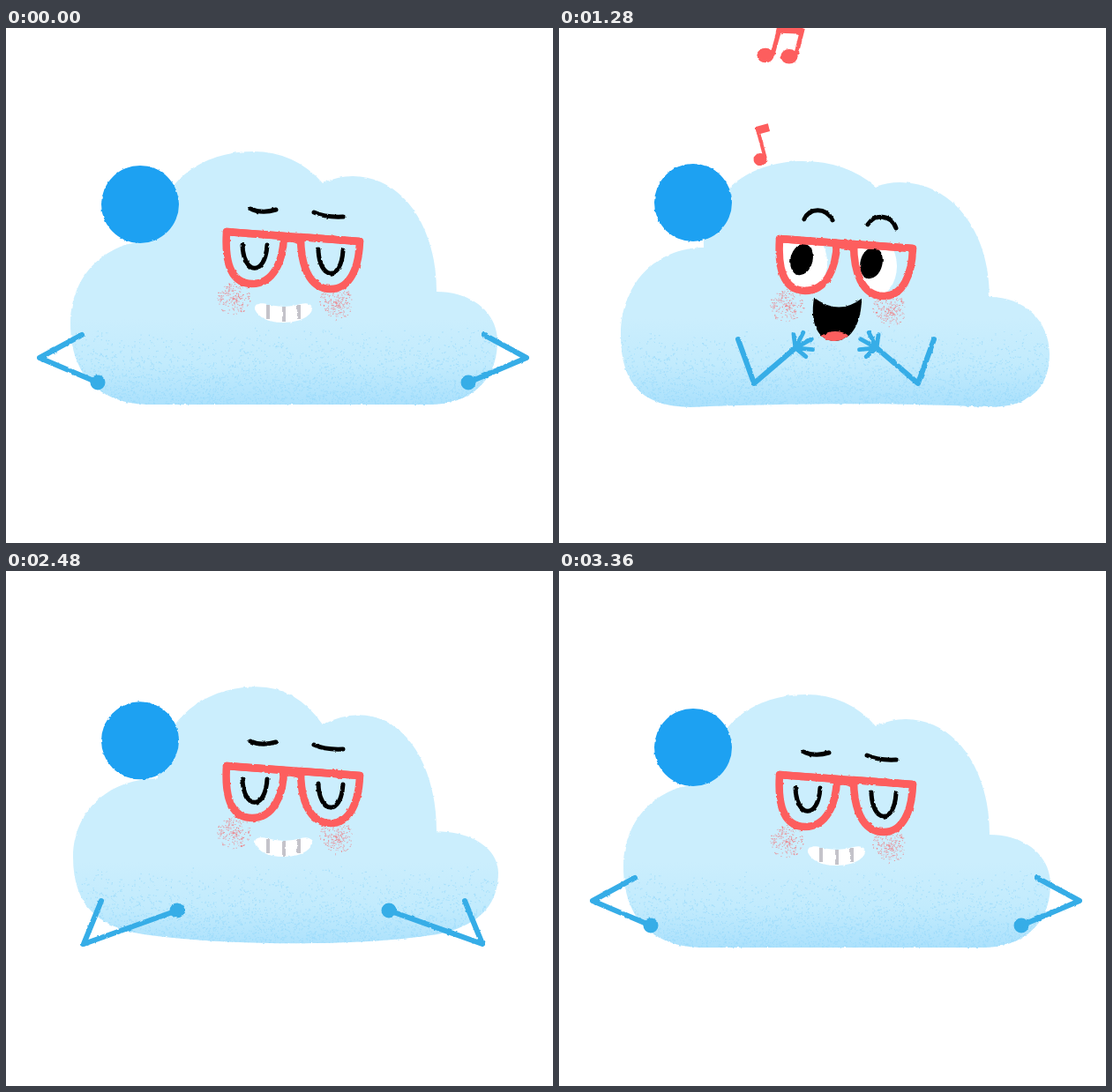
An HTML page for the animation above (3.84 s loop, 620 px wide and 584 px high).

```html
<!DOCTYPE html>
<html lang="en">
<head>
<meta charset="utf-8">
<title>Singing cloud</title>
<style>
  html, body { margin: 0; width: 100%; height: 100%; overflow: hidden; background: #fff; }
  svg { display: block; width: 100%; height: 100%; }
  .line, .arm, .red { fill: none; stroke-linecap: round; stroke-linejoin: round; }
  .line { stroke: #000; stroke-width: 5; }
  .arm { stroke: #36ade7; stroke-width: 6; }
  .red { stroke: #fd5e5e; stroke-width: 8.5; }
  .note { fill: #fd5e5e; }
  .note path { fill: none; stroke: #fd5e5e; stroke-width: 4; }
</style>
</head>
<body>
<svg viewBox="0 0 620 584">
  <defs>
    <filter id="rough" filterUnits="userSpaceOnUse" x="0" y="0" width="620" height="584" color-interpolation-filters="sRGB">
      <feTurbulence type="fractalNoise" baseFrequency=".18" numOctaves="2" seed="4"/>
      <feDisplacementMap in="SourceGraphic" scale="2.5" xChannelSelector="R" yChannelSelector="G"/>
    </filter>
    <linearGradient id="shade" gradientUnits="userSpaceOnUse" x1="0" y1="330" x2="0" y2="432">
      <stop offset="0" stop-color="#cbeefd"/>
      <stop offset=".5" stop-color="#c2ebfd"/>
      <stop offset="1" stop-color="#a9e0fc"/>
    </linearGradient>
    <clipPath id="cloudClip"><path class="cloud"/></clipPath>
    <clipPath id="mouthClip"><path class="mouth"/></clipPath>
    <clipPath id="lensClip"><path class="lens"/></clipPath>
  </defs>
  <g filter="url(#rough)">
    <path class="cloud" fill="url(#shade)"/>
    <g clip-path="url(#cloudClip)"><path id="grain" fill="none" stroke="#93d8fa" stroke-width="1.3" opacity=".6"/></g>
    <circle id="ball" cx="152" r="44" fill="#1da1f2"/>
    <g id="face">
      <path id="blush" fill="none" stroke="#f0797e" opacity=".7"/>
      <g id="awake">
        <g clip-path="url(#lensClip)" fill="#fff">
          <ellipse cx="276" cy="258" rx="28" ry="36"/>
          <ellipse cx="356" cy="262" rx="27" ry="36"/>
        </g>
        <ellipse cx="275" cy="254.500" rx="12.500" ry="18" transform="rotate(14 275 254.500)"/>
        <ellipse cx="354" cy="258.500" rx="12.500" ry="18" transform="rotate(14 354 258.500)"/>
        <path id="browL" class="line" d="M278 203C284 190 302 189 310 204"/>
        <path id="browR" class="line" d="M350 209C357 197 376 197 382 213"/>
        <path class="mouth"/>
        <ellipse id="tongue" cx="313" rx="18" ry="11" fill="#fd5e5e" clip-path="url(#mouthClip)"/>
      </g>
      <g id="asleep">
        <path class="line" d="M268 246C269 280 294 282 296 246M354 251C355 286 380 288 382 252"/>
        <path id="frown" class="line" d="M277 205Q290 211 306 206M349 209Q362 215 382 214"/>
        <g id="grin">
          <path fill="#fff" d="M282 319C281 311 291 312 296 313Q315 319 334 313C345 310 349 316 346 322C340 331 326 334 314 334C297 334 286 328 282 319Z"/>
          <path d="M297 314V330M315 316V333M332 314V330" fill="none" stroke="#c4c3ca" stroke-width="4"/>
        </g>
      </g>
      <path class="lens red"/>
      <path class="red" d="M250 231L401 242M314 240Q324 236 334 242"/>
    </g>
    <g class="arm">
      <g id="left"><path/><path stroke-width="4.800"/><circle r="5.500" fill="#36ade7"/></g>
      <use href="#left" transform="translate(628 0) scale(-1 1)"/>
    </g>
    <g id="single" class="note">
      <ellipse rx="7.500" ry="7"/><path d="M6 0V-35"/><rect x="4" y="-37" width="15" height="9"/>
    </g>
    <g id="double" class="note">
      <ellipse rx="7.500" ry="6.500"/><ellipse cx="21" cy="1" rx="7.500" ry="6.500"/>
      <path d="M6 0L13 -25M27 0L33 -24"/><polygon points="11,-29 34,-28 32,-19 9,-20"/>
    </g>
  </g>
</svg>
<script>
const LOOP = 3840, STEP = 80;
const SING = 240, REST = 1840, BACK = 2320, BEAT = 640;
const { sin, cos, min, max, abs, PI } = Math;
const $ = id => document.getElementById(id);
const setAll = (cls, d) => document.querySelectorAll('.' + cls).forEach(e => e.setAttribute('d', d));
const move = (el, x, y, more = '') => el.setAttribute('transform', `translate(${x} ${y}) ${more}`);
const show = (el, on) => el.setAttribute('display', on ? 'inline' : 'none');
const clamp = (v, lo = 0, hi = 1) => min(hi, max(lo, v));
const mix = (a, b, f) => a + (b - a) * f;
const ease = f => f * f * (3 - 2 * f);

// k runs from -1 (stretched) to 1 (squashed); drop lowers the whole body.
function body(t) {
  if (t < REST) {
    const fade = clamp((t - SING) / 160) * clamp((REST - t) / 160);
    return {
      k: fade * clamp(-1.4 * cos(2 * PI * (t - 880) / BEAT), -1, 1),
      drop: fade * 14 * max(0, sin(2 * PI * (t - 960) / BEAT))
    };
  }
  const u = clamp(t - BACK, 0, 1040), v = (u - 560) / 480;
  const k = v < 0 ? -clamp(1.4 * sin(PI * u / 560)) : .3 * sin(2 * PI * v) * (1 - v);
  return { k, drop: max(0, -k) * u / 70 };
}

// Quarter ellipse from a to b, leaving a along one axis and reaching b along the other
function quarter(a, b, flat) {
  const r = .58, [ax, ay] = a, [bx, by] = b;
  return flat
    ? `C${mix(ax, bx, r)} ${ay} ${bx} ${mix(by, ay, r)} ${bx} ${by}`
    : `C${ax} ${mix(ay, by, r)} ${mix(bx, ax, r)} ${by} ${bx} ${by}`;
}

function cloud(k, drop) {
  const at = (x, y, dx, dy) => [x + dx * k, y + dy * k + drop];
  const up = min(k, 0), down = max(k, 0);
  const neckL = at(168, 241, -4, 8), left = at(73, 335, -3, 13);
  const right = at(557, 355, -1, 15), neckR = at(488, 299, 0, 6);
  const small = at(393, 168, -7, 7), dip = at(359, 176, 0, 4), big = at(280, 140, -4, 11);
  const base = 427 + 16 * up + 3 * down + drop, belly = base - 12 * up - 5 * down;
  const footL = 165 - 15 * down, footR = 480 + 8 * down, tilt = base + 7 * up;
  return `M${neckL}${quarter(neckL, left, true)}
    C${left[0]} ${mix(left[1], base, .65)} ${footL - 58} ${tilt} ${footL} ${base}
    C260 ${belly} 400 ${belly} ${footR} ${base}
    C${footR + 48} ${tilt} ${right[0]} ${mix(right[1], base, .6)} ${right}
    ${quarter(right, neckR, false)}${quarter(neckR, small, false)}
    Q${mix(small[0], dip[0], .5)} ${small[1]} ${dip}
    Q${mix(big[0], dip[0], .6)} ${big[1]} ${big}${quarter(big, neckL, true)}Z`;
}

function mouth(k) {
  const a = abs(k), wide = max(k, 0) * 3;
  const l = 295 - 3 * a - wide, r = 340 + wide, y = 292 + 6 * a, b = 353 - 6 * a;
  $('tongue').setAttribute('cy', b);
  return `M${l} ${y}Q317 ${y + 21} ${r} ${y + 1}C${r} ${y + 26} 333 ${b} 313 ${b}C294 ${b} ${l - 5} ${y + 30} ${l} ${y}Z`;
}

// Shoulder, elbow and hand go from the hips, out low, to the clap.
function arm(t, k, singing) {
  const reach = t < BACK ? ease(clamp((t - SING) / 320)) : 1 - ease(clamp((t - BACK) / 320));
  const kick = t < BACK ? 0 : clamp(1 - (t - 2640) / 500);
  const a = abs(k), up = max(-k, 0);
  const hips = [86, 348, 38 - 10 * kick, 374 - 7 * kick, 104, 402];
  const low = [108, 374, 88, 423, 194, 385];
  const clap = [203, 353 - 6 * up, 229 - 8 * a, 394 + 9 * k, 268 + 15 * up, 347 + 16 * a];
  const [from, to, f] = reach < .5 ? [hips, low, reach * 2] : [low, clap, reach * 2 - 1];
  const [sx, sy, ex, ey, hx, hy] = from.map((v, i) => mix(v, to[i], f));

  const [bone, fingers, fist] = $('left').children;
  bone.setAttribute('d', `M${sx} ${sy}L${ex} ${ey}L${hx} ${hy}`);
  const dir = Math.atan2(hy - ey, hx - ex) + .2;
  let d = '';
  for (let i = -2; i <= 2; i++) {
    const q = dir + i * .6, len = 21 - 1.4 * i * i;
    d += `M${hx} ${hy}l${len * cos(q)} ${len * sin(q)}`;
  }
  fingers.setAttribute('d', d);
  move(fist, hx, hy);
  show(fingers, singing);
  show(fist, !singing);
}

function note(el, age, [x0, y0], [x1, y1], tilt) {
  show(el, age >= 80 && age < 640);
  const f = (age - 80) / 400;
  move(el, mix(x0, x1, f), mix(y0, y1, f), `rotate(${tilt * (1 - f)}) scale(${1 + .28 * f})`);
}

function draw(t) {
  const { k, drop } = body(t);
  const singing = t >= 480 && t < 2400;
  const up = max(-k, 0), down = max(k, 0);
  setAll('cloud', cloud(k, drop));
  move($('grain'), 0, drop - 7 * up + 3 * down);
  $('ball').setAttribute('cy', 200 + drop - 10 * up - 2 * down);

  move($('face'), 0, drop - 12.3 * up + 8 * down);
  show($('awake'), singing);
  show($('asleep'), !singing);
  const brow = 6 * down - 8 * up;
  move($('browL'), 0, brow);
  move($('browR'), 6 * up, brow);
  move($('frown'), 0, -2 * up);
  setAll('mouth', mouth(k));
  const grin = 1 + .45 * sin(PI * clamp((t - 2480) / 480));
  move($('grin'), 0, 322, `scale(1 ${grin}) translate(0 -322)`);
  arm(t, k, singing);

  note($('single'), t < 1200 ? t - 400 : t - 1200, [228, 149], [221, 37], -15);
  note($('double'), t - 800, [226, 155], [234, 31], 0);
}

let seed = 7;
const rnd = () => (seed = seed * 16807 % 2147483647) / 2147483647;
const dots = (n, place) => Array.from({ length: n }, () => {
  const [x, y] = place();
  return `M${x.toFixed(1)} ${y.toFixed(1)}h1.2`;
}).join('');
const puff = (x, y) => dots(190, () => {
  const q = rnd() * 2 * PI, r = 19 * rnd() ** .75;
  return [x + r * cos(q), y + r * sin(q)];
});

$('grain').setAttribute('d', dots(3600, () => [66 + rnd() * 496, 340 + 96 * Math.sqrt(rnd())]));
$('blush').setAttribute('d', puff(258, 307) + puff(374, 312));
setAll('lens', 'M250 231L315 236C314 265 303 290 279 290C253 290 248 262 250 231ZM334 237L401 242C400 272 390 296 368 296C343 296 334 268 334 237Z');

const start = performance.now();
let last = -1;
function tick() {
  const t = Math.floor((performance.now() - start) % LOOP / STEP) * STEP;
  if (t !== last) draw(last = t);
  requestAnimationFrame(tick);
}
tick();
</script>
</body>
</html>
```
